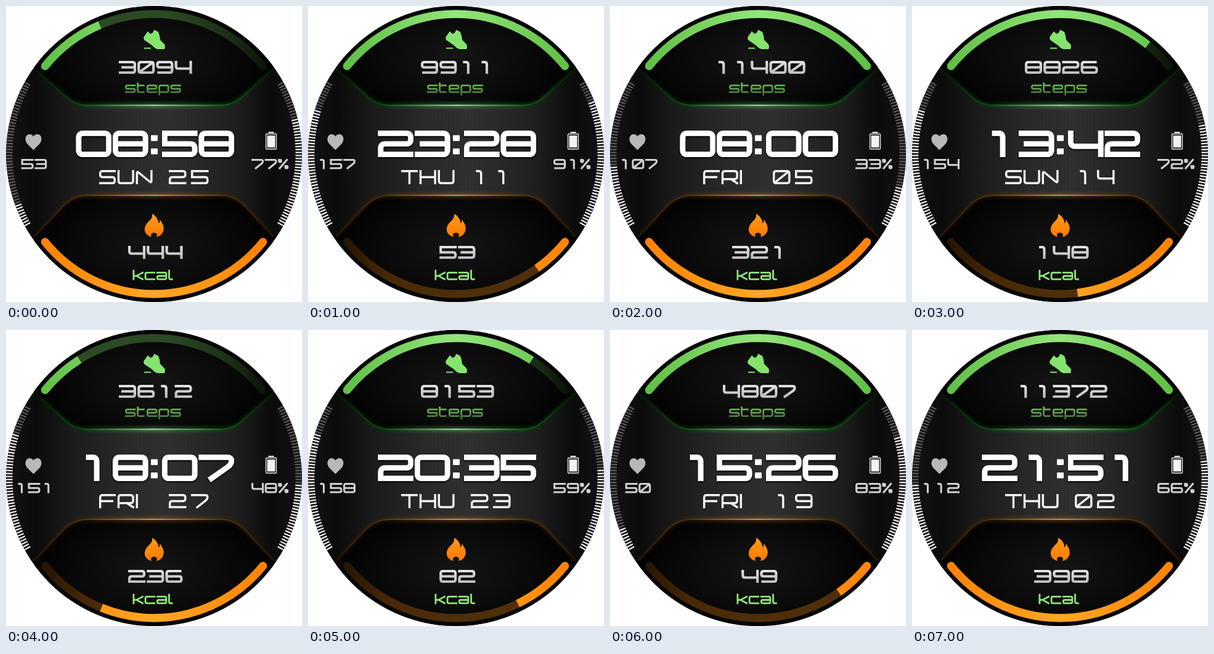
An HTML page for the animation above (8 s loop, 480x480 px).

```html
<!DOCTYPE html>
<html lang="en">
<head>
<meta charset="utf-8">
<title>Watch face</title>
<style>
html, body { margin: 0; width: 100%; height: 100%; overflow: hidden; background: #fff; }
svg { display: block; width: 100vw; height: 100vh; }
#texts path { fill: none; stroke-linecap: square; stroke-linejoin: round; }
</style>
</head>
<body>
<svg viewBox="0 0 480 480" role="img" aria-label="Watch face">
  <defs>
    <clipPath id="dial"><circle cx="240" cy="240" r="240"/></clipPath>
    <linearGradient id="band">
      <stop offset="0" stop-color="#141414"/><stop offset=".1" stop-color="#0b0b0b"/>
      <stop offset=".22" stop-color="#1b1b1b"/><stop offset=".4" stop-color="#2a2a2a"/>
      <stop offset=".55" stop-color="#303030"/><stop offset=".78" stop-color="#1e1e1e"/>
      <stop offset=".9" stop-color="#0b0b0b"/><stop offset="1" stop-color="#131313"/>
    </linearGradient>
    <pattern id="grain" width="6" height="8" patternUnits="userSpaceOnUse">
      <path d="M1 0V8" stroke="#000" stroke-opacity=".07"/>
    </pattern>
    <radialGradient id="panelTop" gradientUnits="userSpaceOnUse" cx="240" cy="85" r="190" gradientTransform="matrix(1 0 0 .55 0 38)">
      <stop offset="0" stop-color="#151515"/><stop offset=".55" stop-color="#0b0b0b"/><stop offset="1" stop-color="#020202"/>
    </radialGradient>
    <radialGradient id="panelLow" gradientUnits="userSpaceOnUse" cx="240" cy="390" r="190" gradientTransform="matrix(1 0 0 .55 0 175)">
      <stop offset="0" stop-color="#151515"/><stop offset=".55" stop-color="#0b0b0b"/><stop offset="1" stop-color="#020202"/>
    </radialGradient>
    <linearGradient id="edgeTop" gradientUnits="userSpaceOnUse" x1="46" x2="434" y1="0" y2="0">
      <stop offset="0" stop-color="#041a05"/><stop offset=".2" stop-color="#0b4c11"/>
      <stop offset=".5" stop-color="#8fdc8c"/><stop offset=".8" stop-color="#0b5a11"/><stop offset="1" stop-color="#041c05"/>
    </linearGradient>
    <linearGradient id="edgeLow" gradientUnits="userSpaceOnUse" x1="46" x2="434" y1="0" y2="0">
      <stop offset="0" stop-color="#2a1804"/><stop offset=".2" stop-color="#50310b"/>
      <stop offset=".5" stop-color="#d18c35"/><stop offset=".8" stop-color="#50310b"/><stop offset="1" stop-color="#2a1804"/>
    </linearGradient>
    <linearGradient id="green" gradientUnits="userSpaceOnUse" x1="57" x2="423" y1="0" y2="0">
      <stop offset="0" stop-color="#5fbf44"/><stop offset=".5" stop-color="#94e67c"/><stop offset="1" stop-color="#5fbf44"/>
    </linearGradient>
    <linearGradient id="greenTrack" gradientUnits="userSpaceOnUse" x1="57" x2="423" y1="0" y2="0">
      <stop offset="0" stop-color="#2c4a24"/><stop offset=".55" stop-color="#2c4925"/>
      <stop offset=".85" stop-color="#1a2d14"/><stop offset="1" stop-color="#0a1207"/>
    </linearGradient>
    <linearGradient id="orange" gradientUnits="userSpaceOnUse" x1="57" x2="423" y1="0" y2="0">
      <stop offset="0" stop-color="#ff8204"/><stop offset=".5" stop-color="#ffa726"/><stop offset="1" stop-color="#ff8204"/>
    </linearGradient>
    <linearGradient id="orangeTrack" gradientUnits="userSpaceOnUse" x1="57" x2="423" y1="0" y2="0">
      <stop offset="0" stop-color="#241403"/><stop offset=".2" stop-color="#482806"/><stop offset=".5" stop-color="#4e2f0a"/>
    </linearGradient>
    <linearGradient id="flame" x2="0" y2="1"><stop offset="0" stop-color="#ff9a1c"/><stop offset="1" stop-color="#ff7a00"/></linearGradient>
    <linearGradient id="silver" x2="0" y2="1"><stop offset="0" stop-color="#e0e0e0"/><stop offset="1" stop-color="#c0c0c0"/></linearGradient>
    <linearGradient id="moss" x2="0" y2="1"><stop offset="0" stop-color="#72b85c"/><stop offset="1" stop-color="#416f34"/></linearGradient>
    <filter id="soft" x="-20%" y="-60%" width="140%" height="220%"><feGaussianBlur stdDeviation="3"/></filter>
    <filter id="drop" x="-10%" y="-20%" width="120%" height="150%">
      <feDropShadow dx="0" dy="2" stdDeviation="1.5" flood-color="#000" flood-opacity=".8"/>
    </filter>
    <path id="rimTop" d="M46 101L97 147Q112 161 134 161H346Q368 161 383 147L434 101"/>
    <path id="rimLow" d="M46 374L93 324Q110 307 134 307H346Q370 307 387 324L434 374"/>
  </defs>
  <g clip-path="url(#dial)">
    <rect width="480" height="480" fill="url(#band)"/>
    <rect width="480" height="480" fill="url(#grain)"/>
    <path d="M46 101L97 147Q112 161 134 161H346Q368 161 383 147L434 101V0H46Z" fill="url(#panelTop)"/>
    <path d="M46 374L93 324Q110 307 134 307H346Q370 307 387 324L434 374V480H46Z" fill="url(#panelLow)"/>
    <g fill="none">
      <g stroke="url(#edgeTop)">
        <use href="#rimTop" stroke-width="5" opacity=".6" filter="url(#soft)"/>
        <use href="#rimTop" stroke-width="2"/>
      </g>
      <g stroke="url(#edgeLow)">
        <use href="#rimLow" stroke-width="5" opacity=".5" filter="url(#soft)"/>
        <use href="#rimLow" stroke-width="2"/>
      </g>
    </g>
    <g id="ticks" stroke-width="2.2"></g>
    <g id="arcs" fill="none" stroke-width="13"></g>
    <path d="M230 41L234 45Q239 45 240 38.500L247 42L249 48L250 55L257 62Q259 66 257 70H246Q241 69 237 64L224 55Q222 51 225 48Z" fill="#86e36e"/>
    <path d="M224 68.500H235" stroke="#86e36e" stroke-width="2"/>
    <path d="M44.500 233.500L34 223C29 216 32 208 38.500 208Q42.500 208 44.500 211.500Q46.500 208 51 208C57 208 60 216 55 223Z" fill="#b8b8b8"/>
    <g fill="#f2f2f2">
      <rect x="425.500" y="204" width="9" height="2"/>
      <rect x="423.500" y="210" width="13" height="19.500"/>
      <rect x="421.500" y="207.500" width="17" height="24.500" rx="1" fill="none" stroke="#f2f2f2" stroke-width="1.300"/>
    </g>
    <path d="M237 337C238 345 233 347 229 352C224 358 223 366 229 371Q232 374 236 374.500Q233 368 240 367.500Q247 368 244 374.500C252 373 257 366 255.500 358C254.500 353 252 350 249 346Q250 351 247.500 352.500C247 346 243 340 237 337Z" fill="url(#flame)"/>
    <g id="texts"></g>
  </g>
</svg>
<script>
const NS = 'http://www.w3.org/2000/svg';
const $ = id => document.getElementById(id);
const add = (parent, tag, attrs) => {
  const el = document.createElementNS(NS, tag);
  for (const k in attrs) el.setAttribute(k, attrs[k]);
  return parent.appendChild(el);
};

// Stroke glyphs on a 6 x 6 grid: points "xy" or "x,y", strokes split by "|".
// Bends inside a stroke are rounded, joins between strokes stay square.
const GLYPHS = {
  0: '30 60 66 06 00 30', O: '30 60 66 06 00 30|15 51',
  1: '2,0 3.6,0 3.6,6', 2: '00 60 63 03 06|06 66',
  3: '00 60 66 06|13 63', 4: '00 0,3.7 6,3.7|60 66',
  5: '60 00|00 03|03 63 66 06', 6: '5.5,0 00 06 66 63 03',
  7: '00 60 62 26', 8: '30 60 66 06 00 30|03 63',
  9: '63 03 00 60 66 0.5,6',
  '%': '00 1.2,0 1.2,1.5 0,1.5 00|4.5,0 0.4,6|3.7,4.5 4.9,4.5 4.9,6 3.7,6 3.7,4.5',
  S: '60 00 03 63 66 06', U: '00 06 66 60', N: '06 00 66 60',
  T: '00 60|30 36', H: '00 06|60 66|03 63', F: '60 00 06|03 53',
  R: '06 00 60 64 04|3.4,4 66', I: '00 06',
  s: '60 00 03 63 66 06', t: '0,-1.8 06 46|00 40', e: '03 63 60 00 06 66',
  p: '0,8.2 00 60 66 06', k: '0,-1.8 06|03 23 60|23 66', c: '60 00 06 66',
  a: '00 60 66 06 03 63', l: '0,-1.8 06 26'
};
const WIDTH = { I: 0, l: 2, t: 4.6 };

function strokePath(pts, r) {
  let d = 'M' + pts[0];
  for (let i = 1; i < pts.length - 1; i++) {
    const p = pts[i];
    const toward = q => {
      const len = Math.hypot(q[0] - p[0], q[1] - p[1]);
      const k = Math.min(r / len, .5);
      return [p[0] + (q[0] - p[0]) * k, p[1] + (q[1] - p[1]) * k];
    };
    d += `L${toward(pts[i - 1])}Q${p} ${toward(pts[i + 1])}`;
  }
  return d + 'L' + pts[pts.length - 1];
}

// x, y, w, h give the outer box of one glyph; pitch 0 means proportional
function textPath(str, { x, y, w, h, sw, pitch, gap = 3, mid }) {
  let left = mid === undefined ? x : mid - str.length * pitch / 2 + (pitch - w) / 2;
  let d = '';
  for (const ch of str) {
    const r = ch === '%' ? h * .05 : h * .17;
    for (const part of GLYPHS[ch].split('|')) {
      const pts = part.split(' ').map(t => {
        const [a, b] = t.includes(',') ? t.split(',') : t;
        return [left + sw / 2 + a / 6 * (w - sw), y + sw / 2 + b / 6 * (h - sw)];
      });
      d += strokePath(pts, r);
    }
    left += pitch || (WIDTH[ch] ?? 6) / 6 * (w - sw) + sw + gap;
  }
  return d;
}

const big = { y: 202, w: 57.5, h: 43, sw: 8.7, pitch: 59.5, stroke: '#fff', filter: 'url(#drop)' };
const mid = { w: 28, h: 21, sw: 4.1, pitch: 30.2, mid: 242.3, stroke: 'url(#silver)' };
const small = { y: 248, w: 20, h: 16.5, sw: 3.1, stroke: '#d0d0d0' };
const date = { y: 266, h: 23, sw: 3.4, stroke: '#f4f4f4' };
const unit = { w: 17.4, h: 13.5, sw: 2.8, pitch: 0, gap: 1.8 };
const STYLE = {
  hour: { ...big, x: 113.5 }, minute: { ...big, x: 253 },
  day: { ...date, x: 151, w: 27, pitch: 0, gap: 2.8 },
  dom: { ...date, x: 264, w: 28.5, pitch: 36 },
  steps: { ...mid, y: 89 }, kcal: { ...mid, y: 389 },
  heart: { ...small, mid: 45.5, pitch: 21.6 },
  power: { ...small, x: 398, pitch: 21.6 },
  stepsUnit: { ...unit, x: 193, y: 127.5, stroke: 'url(#moss)' },
  kcalUnit: { ...unit, x: 205.5, y: 431, stroke: '#8ee67a' }
};

const labels = {};
for (const name in STYLE) {
  const { stroke, sw, filter } = STYLE[name];
  labels[name] = add($('texts'), 'path', { stroke, 'stroke-width': sw });
  if (filter) labels[name].setAttribute('filter', filter);
}
for (const y of [209.5, 231]) {
  add($('texts'), 'rect', { x: 235, y, width: 11, height: 9.5, rx: 1, fill: '#fff' });
}
const write = (name, str) => labels[name].setAttribute('d', textPath(str, STYLE[name]));
write('stepsUnit', 'steps');
write('kcalUnit', 'kcal');

const RAD = Math.PI / 180, SPAN = 51.1, RADIUS = 227;
const polar = (deg, r) => [240 + r * Math.sin(deg * RAD), 240 - r * Math.cos(deg * RAD)];
const arc = (a, b) => `M${polar(a, RADIUS)}A${RADIUS} ${RADIUS} 0 0 1 ${polar(b, RADIUS)}`;

// One gauge: dim track, lit arc with a flat end, round cap at the start
function gauge(from, track, lit) {
  add($('arcs'), 'path', { d: arc(from, from + 2 * SPAN), stroke: track, 'stroke-linecap': 'round' });
  const bar = add($('arcs'), 'path', { stroke: lit });
  const caps = [from, from + 2 * SPAN].map(a => {
    const [cx, cy] = polar(a, RADIUS);
    return add($('arcs'), 'circle', { cx, cy, r: 6.5, fill: lit, stroke: 'none' });
  });
  return v => {
    bar.setAttribute('d', arc(from, from + 2 * SPAN * v));
    caps[1].setAttribute('visibility', v < 1 ? 'hidden' : 'visible');
  };
}
const setSteps = gauge(-SPAN, 'url(#greenTrack)', 'url(#green)');
const setKcal = gauge(180 - SPAN, 'url(#orangeTrack)', 'url(#orange)');

const TICKS = 50;
function scale(side) {
  const marks = Array.from({ length: TICKS }, (_, i) => {
    const a = side * (90 + 29 - 58 * i / (TICKS - 1));
    const [x1, y1] = polar(a, 229.5), [x2, y2] = polar(a, 240);
    return add($('ticks'), 'line', { x1, y1, x2, y2 });
  });
  return v => marks.forEach((m, i) => m.setAttribute('stroke', i < v * TICKS ? '#f4f4f4' : '#5c5c5c'));
}
const setHeart = scale(-1), setPower = scale(1);

// time, day, date, steps, arc, kcal, arc, pulse, ticks, battery, ticks ("O" is the slashed zero)
const STATES = [
  ['08:58', 'SUN', '25', '3O94', .277, '444', 1, '53', .155, '77%', .74],
  ['23:28', 'THU', '11', '9911', 1, '53', .155, '157', .8, '91%', .85],
  ['08:00', 'FRI', 'O5', '114OO', 1, '321', 1, '1O7', .42, '33%', .27],
  ['13:42', 'SUN', '14', '8826', .88, '148', .43, '154', .8, '72%', .7],
  ['18:07', 'FRI', '27', '3612', .185, '236', .716, '151', .8, '48%', .45],
  ['20:35', 'THU', '23', '8153', .82, '82', .244, '158', .8, '59%', .55],
  ['15:26', 'FRI', '19', '48O7', 1, '49', .155, '5O', .155, '83%', .77],
  ['21:51', 'THU', 'O2', '11372', 1, '398', 1, '112', .46, '66%', .62]
];

let shown = -1;
function show(n) {
  const [time, day, dom, steps, stepArc, kcal, kcalArc, pulse, pulseTicks, power, powerTicks] = STATES[n];
  const [hour, minute] = time.split(':');
  const texts = { hour, minute, day, dom, steps, kcal, heart: pulse, power };
  for (const name in texts) write(name, texts[name]);
  setSteps(stepArc);
  setKcal(kcalArc);
  setHeart(pulseTicks);
  setPower(powerTicks);
  document.querySelector('svg').setAttribute('aria-label',
    `${time} ${day} ${dom}, ${steps} steps, ${kcal} kcal, pulse ${pulse}, battery ${power}`.replace(/O/g, '0'));
  shown = n;
}

const start = performance.now();
function tick() {
  const n = Math.floor((performance.now() - start) % 8000 / 1000);
  if (n !== shown) show(n);
  requestAnimationFrame(tick);
}
tick();
</script>
</body>
</html>
```
